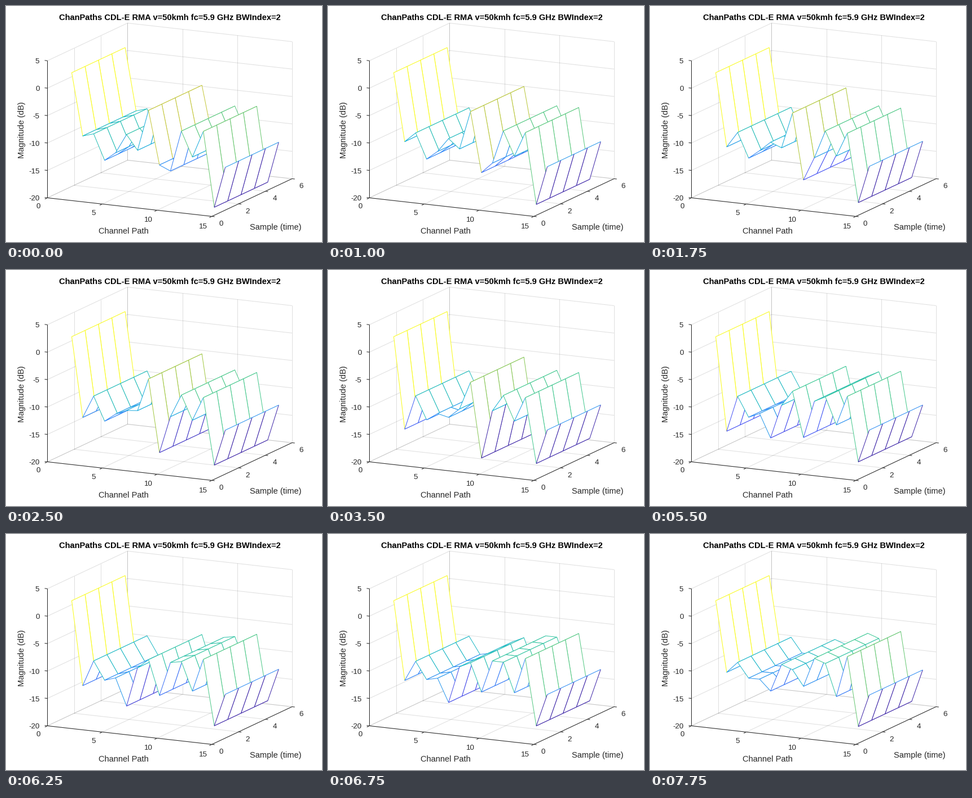
Write a matplotlib script that moves like this. It is 560 by 420 pixels and loops after 8 s.

```python
import numpy as np
import matplotlib.pyplot as plt
from matplotlib.animation import FuncAnimation
from matplotlib.collections import LineCollection, PolyCollection
from matplotlib.colors import LinearSegmentedColormap

W, H, DPI = 560, 420, 80
FRAMES, INTERVAL = 32, 250
PX = 72 / DPI  # points per pixel
INK = (0.15, 0.15, 0.15)

plt.rcParams["font.family"] = "Liberation Sans"

PARULA = LinearSegmentedColormap.from_list("parula", [
    (0.2422, 0.1504, 0.6603), (0.2810, 0.3228, 0.9579),
    (0.1786, 0.5289, 0.9682), (0.0689, 0.6948, 0.8394),
    (0.2161, 0.7843, 0.5923), (0.6720, 0.7793, 0.2227),
    (0.9970, 0.7659, 0.2199), (0.9769, 0.9839, 0.0805)])


def steady(level):
    return lambda step: level


def drift(start, mid, end):
    """Parabola in dB through the start, middle and end of the loop."""
    def gain(step):
        u = step / (FRAMES - 1)
        return (start * (1 - u) * (1 - 2 * u) + 4 * mid * u * (1 - u)
                + end * u * (2 * u - 1))
    return gain


def fade(low, center, width):
    """Dip to `low` dB at step `center`, recovering on both sides."""
    return lambda step: low + 5 * np.log10(1 + ((step - center) / width) ** 2)


PATHS = [
    steady(1.9),
    fade(-16.8, 18.3, 3.4),
    drift(-8.8, -8.45, -8.9),
    drift(-13.4, -12.5, -11.55),
    drift(-11.8, -11.2, -11.5),
    fade(-16.2, 24.6, 4),
    drift(-10.9, -9.8, -8.4),
    drift(-3.4, -5.1, -9.1),
    fade(-18.5, 13.2, 4),
    drift(-14, -9.2, -6.6),
    drift(-6.5, -6.6, -7.3),
    drift(-11, -11.1, -13.1),
    drift(-6.1, -6.5, -5.6),
    drift(-19.7, -18.2, -18.1),
    drift(-12.2, -11.95, -12.15),
]


def project(x, y, z):
    """Orthographic view of the data box, in stage pixels."""
    return (73 + 291.5 / 15 * x + 142 / 6 * y,
            341 + 33 / 15 * x - 67 / 6 * y - 244 / 25 * (z + 20))


fig = plt.figure(figsize=(W / DPI, H / DPI), dpi=DPI, facecolor="white")
ax = fig.add_axes([0, 0, 1, 1])
# Just under half a pixel, so that snapped lines do not round up
ax.set_xlim(-0.4, W - 0.4)
ax.set_ylim(H - 0.4, -0.4)
ax.axis("off")


def segments(pairs, z, **style):
    lines = [[project(*a), project(*b)] for a, b in pairs]
    ax.add_collection(LineCollection(lines, zorder=z, linewidths=PX, **style))


def label(x, y, text, size, **style):
    style = {"ha": "center", "color": INK, **style}
    ax.text(x, y, text, fontsize=size * PX, va="center_baseline", **style)


X_TICKS, Y_TICKS, Z_TICKS = range(0, 16, 5), range(0, 7, 2), range(-20, 6, 5)

grid = []
for x in X_TICKS:
    grid += [((x, 0, -20), (x, 6, -20)), ((x, 6, -20), (x, 6, 5))]
for y in Y_TICKS:
    grid += [((0, y, -20), (15, y, -20)), ((0, y, -20), (0, y, 5))]
for z in Z_TICKS:
    grid += [((0, 0, z), (0, 6, z)), ((0, 6, z), (15, 6, z))]
segments(grid, 1, colors=[(*INK, 0.15)])

axes = [((0, 0, -20), (15, 0, -20)), ((15, 0, -20), (15, 6, -20)),
        ((0, 0, -20), (0, 0, 5))]
axes += [((x, 0, -20), (x, -0.19, -20)) for x in X_TICKS]
axes += [((15, y, -20), (15.25, y, -20)) for y in Y_TICKS]
axes += [((0, 0, z), (-0.25, 0, z)) for z in Z_TICKS]
segments(axes, 2, colors=[INK])

for i, x in enumerate(X_TICKS):
    label(57 + 97.5 * i, 355.5 + 12 * i, str(x), 13.33)
for i, y in enumerate(Y_TICKS):
    label(380.5 + 47.5 * i, 386 - 22.3 * i, str(y), 13.33)
for z in Z_TICKS:
    label(59, project(0, 0, z)[1] + 0.5, str(z), 13.33, ha="right")

label(289.5, 19, "ChanPaths CDL-E RMA v=50kmh fc=5.9 GHz BWIndex=2", 14.6,
      weight="bold", color="black")
label(208, 399.5, "Channel Path", 14.67)
label(477.5, 392.5, "Sample (time)", 14.67)
ax.text(28, 220.5, "Magnitude (dB)", fontsize=14.67 * PX, color=INK,
        rotation=90, ha="center", va="center")

mesh = PolyCollection([], zorder=3, linewidths=PX)
ax.add_collection(mesh)


def draw(step):
    z = np.array([gain(step) for gain in PATHS])
    colors = PARULA((z - z.min()) / (z.max() - z.min()))
    shapes, faces, edges = [], [], []
    # Painter's order: far samples first, then left to right
    for y in (4, 3, 2, 1):
        for i in range(len(z) - 1):
            a, b = project(i + 1, y, z[i]), project(i + 1, y + 1, z[i])
            c, d = project(i + 2, y + 1, z[i + 1]), project(i + 2, y, z[i + 1])
            shapes += [[d, a, b, c], [c, d]]
            faces += [(1, 1, 1, 1), (0, 0, 0, 0)]
            edges += [colors[i], colors[i + 1]]
    mesh.set_verts(shapes, closed=False)
    mesh.set_facecolor(faces)
    mesh.set_edgecolor(edges)
    return [mesh]


anim = FuncAnimation(fig, draw, frames=FRAMES, interval=INTERVAL,
                     repeat=True, repeat_delay=0)
plt.show()
```
